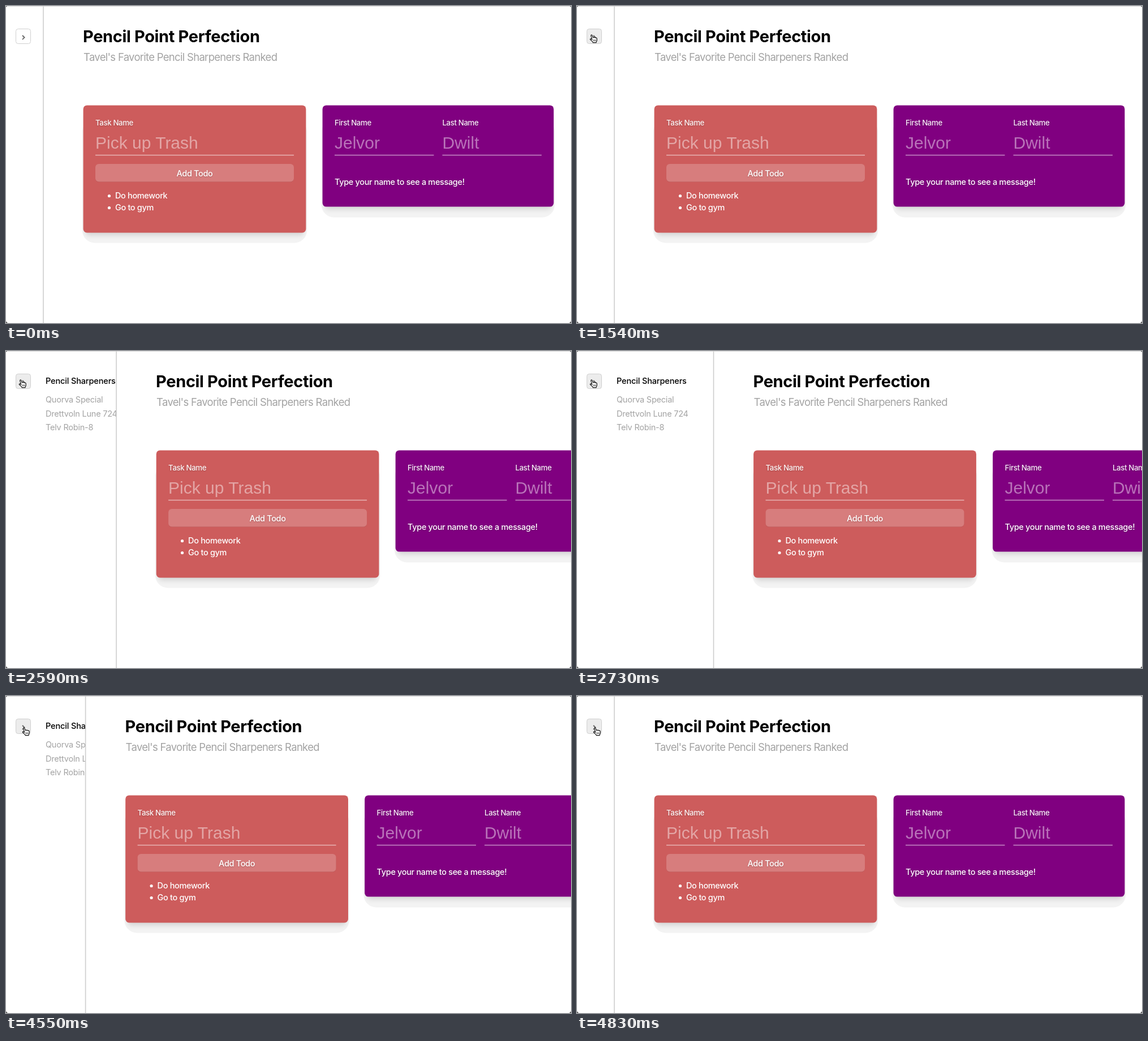
Write an HTML page that moves like this. It is 999 px wide and 560 px high and loops after 4970 ms.

```html
<!DOCTYPE html>
<html lang="en">
<head>
<meta charset="utf-8">
<title>Sliding sidebar</title>
<style>
  html, body { margin: 0; width: 100%; height: 100%; overflow: hidden; background: #fff; }
  svg { display: block; width: 100vw; height: 100vh; }
  text { font: 500 14.5px Inter, "Open Sans", sans-serif; letter-spacing: -.024em; fill: #fff; }
  .title { font-size: 29px; font-weight: 700; letter-spacing: -.0125em; fill: #000; }
  .subtitle { font-size: 18.5px; font-weight: 400; letter-spacing: -.038em; fill: #a3a3a3; }
  .label { font-size: 13.3px; letter-spacing: -.03em; fill: #fffe; }
  .hint { font: 30px "Liberation Sans", Arial, sans-serif; letter-spacing: 0; fill: #fff; fill-opacity: .45; }
  .heading { letter-spacing: -.01em; fill: #000; }
  .item { font-weight: 400; letter-spacing: -.015em; fill: #a3a3a3; }
  .rule { stroke: #fff; stroke-opacity: .55; stroke-width: 1.6; }
  .lit { filter: drop-shadow(0 1px 1px #0003); }
  .halo { fill: #f3f3f3; }
  .shade { fill: #000; fill-opacity: .13; filter: blur(4px); }
</style>
</head>
<body>
<svg viewBox="0 0 999 560" preserveAspectRatio="none">
  <rect width="999" height="560" fill="#fff"/>

  <g id="sidebar">
    <text class="heading" x="70" y="58">Pencil Sharpeners</text>
    <text class="item" x="70" y="91">Quorva Special</text>
    <text class="item" x="70" y="115.5">Drettvoln Lune 724</text>
    <text class="item" x="70" y="140">Telv Robin-8</text>
  </g>

  <g id="page">
    <rect x="66" width="1000" height="560" fill="#fff"/>
    <path d="M66 0V560" stroke="#cdcdcd" stroke-width="1.6"/>
    <text class="title" x="136" y="64">Pencil Point Perfection</text>
    <text class="subtitle" x="137" y="96.5">Tavel's Favorite Pencil Sharpeners Ranked</text>

    <g>
      <rect class="halo" x="135" y="200" width="397" height="218.5" rx="22"/>
      <rect class="shade" x="141" y="186" width="385" height="219" rx="6"/>
      <rect x="136.6" y="175.4" width="393.8" height="225" rx="6.5" fill="#cd5c5c"/>
      <text class="label lit" x="158" y="211">Task Name</text>
      <text class="hint" x="158" y="252">Pick up Trash</text>
      <path class="rule" d="M158 263.5H509"/>
      <rect x="158" y="280" width="351" height="31" rx="6" fill="#000" fill-opacity=".12"/>
      <rect x="158" y="279" width="351" height="31.5" rx="6" fill="#d77d7d"/>
      <text class="lit" x="333.5" y="300.5" text-anchor="middle">Add Todo</text>
      <circle cx="182.5" cy="335.5" r="2.6" fill="#fff"/>
      <text x="193" y="340">Do homework</text>
      <circle cx="182.5" cy="356.5" r="2.6" fill="#fff"/>
      <text x="193" y="361">Go to gym</text>
    </g>

    <g>
      <rect class="halo" x="558" y="200" width="412" height="173.5" rx="22"/>
      <rect class="shade" x="564" y="186" width="400" height="173" rx="6"/>
      <rect x="559.6" y="175.4" width="408.8" height="179.2" rx="6.5" fill="#800080"/>
      <text class="label lit" x="581" y="211">First Name</text>
      <text class="label lit" x="771.5" y="211">Last Name</text>
      <text class="hint" x="581" y="252">Jelvor</text>
      <text class="hint" x="771.5" y="252">Dwilt</text>
      <path class="rule" d="M581 263.5H756.5M771.5 263.5H947"/>
      <text class="lit" x="581" y="315.5">Type your name to see a message!</text>
    </g>
  </g>

  <rect id="toggle" x="17.5" y="40.5" width="26" height="26" rx="4" fill="#fff" stroke="#d0d0d0"/>
  <path d="M29 52L32.6 55.6 29 59.2" fill="none" stroke="#666" stroke-width="1.8"/>

  <g id="cursor" stroke-linejoin="round">
    <path id="arrow" d="M0 0V11.6L2.7 9.1 4.5 13.4 6.4 12.6 4.6 8.4H8.4Z"
      stroke="#fff" stroke-width="1.4" paint-order="stroke"/>
    <g id="hand" transform="translate(-3.5 -.7)" stroke="#111" stroke-width="1.2">
      <path fill="#fff" d="M4.2 9L2.2 2.4C1.8 .8 3.8 .2 4.4 1.8L5.8 5.6C6.2 4.6 7.8 4.6 8.2 5.6
        8.8 4.9 10.2 5 10.5 6.1 11.4 5.6 12.6 6 12.7 7.4V10.4C12.5 12 11.6 12.6 11.4 14.3H5.8
        C5.6 12.8 3.6 11.6 1.2 9.2 .2 8 1.6 7 3 7.9Z"/>
      <path stroke-width=".8" d="M6.6 9V12M8.5 9V12M10.4 9V12"/>
    </g>
  </g>

  <path d="M0 .5H999" stroke="#d9d9d9"/>
  <path d="M0 0H2L0 2ZM999 0H997L999 2ZM0 560V557L3 560ZM999 560V557L996 560Z" fill="#555"/>
</svg>

<script>
const STEP = 70, LOOP = 4970, TRAVEL = 175.5;
const [page, toggle, cursor, arrow, hand] =
  ["page", "toggle", "cursor", "arrow", "hand"].map(id => document.getElementById(id));

// step, x, y of the pointer's hot spot
const path = [
  [1, 795, 203], [2, 640, 400], [3, 440, 497], [4, 280, 430], [5, 207, 316], [6, 207, 316],
  [7, 192, 290], [9, 150, 215], [11, 95, 140], [14, 36, 77],
  [15, 34, 72], [17, 14, 45], [18, 7, 33], [19, 8, 31], [21, 22, 45], [22, 26, 51],
  [50, 26, 51], [51, 28, 54], [52, 30, 64], [54, 33, 104], [55, 33, 112], [58, 36, 65], [60, 32, 56]
];

const clamp = v => Math.min(1, Math.max(0, v));
const ease = (t, start, length) => (1 - Math.cos(Math.PI * clamp((t - start) / length))) / 2;

function pointerAt(step) {
  const next = path.findIndex(p => p[0] >= step);
  if (next < 0) return path.at(-1).slice(1);
  const b = path[next], a = path[next - 1] || b;
  const k = b === a ? 0 : (step - a[0]) / (b[0] - a[0]);
  return [a[1] + (b[1] - a[1]) * k, a[2] + (b[2] - a[2]) * k];
}

const show = (el, on) => el.setAttribute("visibility", on ? "visible" : "hidden");

function draw(step) {
  const t = step * STEP;
  const dx = TRAVEL * (ease(t, 2323, 407) - ease(t, 4276, 500));
  page.setAttribute("transform", `translate(${dx.toFixed(1)})`);

  const [x, y] = pointerAt(step);
  const visible = step > 0;
  const over = visible && x > 17 && x < 44 && y > 41 && y < 65;
  cursor.setAttribute("transform", `translate(${x.toFixed(1)} ${y.toFixed(1)})`);
  show(arrow, visible && !over);
  show(hand, over);
  toggle.setAttribute("fill", over ? "#ececec" : "#fff");
}

const began = performance.now();
function tick() {
  draw(Math.floor((performance.now() - began) % LOOP / STEP));
  requestAnimationFrame(tick);
}
tick();
</script>
</body>
</html>
```
